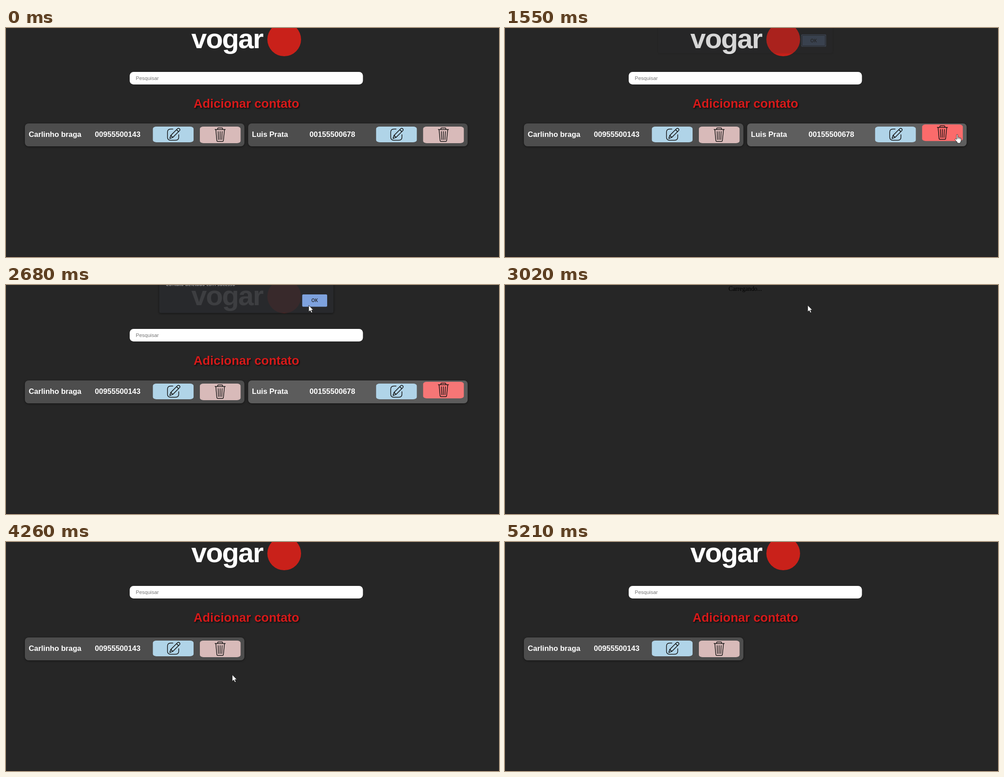
An HTML page that plays this animation: 1096 by 511 pixels, repeating every 5.88 s.

```html
<!DOCTYPE html>
<html lang="pt">
<head>
<meta charset="utf-8">
<title>Contatos</title>
<style>
  html, body { margin: 0; width: 100%; height: 100%; overflow: hidden; background: #262626; }
  svg { display: block; width: 1096px; height: 511px; font-family: "Liberation Sans", Arial, sans-serif; }
  .bold { font-weight: bold; font-size: 16.6px; fill: #fff; }
  .icon { fill: none; stroke: #111; stroke-width: 1.5; stroke-linejoin: round; stroke-linecap: round; }
  .card { filter: drop-shadow(0 1px 2px #0008); }
  #title { font-weight: bold; font-size: 27.65px; fill: #d51a1a; text-shadow: 2px 2px 3px #000a; }
  #brand { font-weight: bold; font-size: 62px; letter-spacing: -2px; fill: #fff; }
  #dialog { filter: drop-shadow(0 1px 2px #0009); }
</style>
</head>
<body>
<svg viewBox="0 0 1096 511">
  <defs>
    <g id="edit" class="icon">
      <path d="M371 225.500H366Q359 225.500 359 232.500V243.500Q359 250.500 366 250.500H377Q384 250.500 384 243.500V238"/>
      <path transform="translate(375 235.500) rotate(45)" d="M-3.200 9V-12Q-3.200 -15 0 -15T3.200 -12V9L0 15.500ZM-3.200 -9H3.200M-3.200 9H3.200"/>
    </g>
    <g id="trash" class="icon">
      <path d="M464.700 226.500H487.500M470.500 226V224.500Q470.500 223 472 223H480Q481.500 223 481.500 224.500V226"/>
      <path d="M466.500 227L468.700 251Q469 253.300 471 253.300H481Q483 253.300 483.300 251L485.700 227M471.600 231L472.500 249M476 231V249M480.500 231L479.600 249"/>
    </g>
  </defs>
  <rect width="1096" height="511" fill="#262626"/>
  <g id="page">
    <text id="brand" x="412" y="45">vogar</text>
    <circle cx="618.500" cy="25.500" r="37.500" fill="#c9211a"/>
    <rect x="275" y="98" width="518.500" height="28" rx="8.500" fill="#fff"/>
    <text x="288.500" y="115.700" font-size="11.500" fill="#757575">Pesquisar</text>
    <text id="title" x="417" y="178">Adicionar contato</text>
    <g id="cards"></g>
  </g>
  <text id="loading" x="497" y="13" font-size="13.700" font-family="Liberation Serif, Times, serif">Carregando...</text>
  <g id="dialog">
    <rect x="340.500" y="-60" width="387.500" height="130.500" rx="4" fill="#292a2d"/>
    <text x="355" y="10.500" font-size="10.800" fill="#e8eaed" font-family="Open Sans, Noto Sans, sans-serif">Contato deletado com sucesso</text>
    <rect id="ok" x="658.500" y="29" width="55.500" height="27.500" rx="2.500"/>
    <rect id="ring" x="660.500" y="31" width="51.500" height="23.500" rx="1.500" fill="none" stroke="#292a2d"/>
    <text x="686" y="46.200" font-size="10.300" font-weight="600" text-anchor="middle" fill="#202124" font-family="Open Sans, Noto Sans, sans-serif">OK</text>
  </g>
  <rect y="510" width="1096" height="1" fill="#231b1f"/>
  <g id="cursor" stroke="#111" stroke-width=".8" fill="#fff">
    <path id="arrow" d="M0 -.7V13.800L3.400 10.800L5.800 16.100L8.200 15L5.900 9.900H10.300Z"/>
    <path id="hand" d="M4 11V2Q4 .5 5.200 .5T6.500 2V7Q9 6 9.300 7.500Q11.500 7 11.800 8.300Q14 8 14 10V14Q14 16 12.500 18V20H5.500V18L.7 12.500Q0 10.500 1.500 10Q2.500 10 4 12Z"/>
    <path id="fingers" d="M6.500 7V11M9.300 7.500V11M11.800 8.300V11.500" fill="none"/>
  </g>
</svg>
<script>
const LOOP = 5880;
const $ = id => document.getElementById(id);

const card = (id, dx, name, phone, phoneX) => `
  <g id="${id}" transform="translate(${dx})">
    <rect class="card" x="42" y="213" width="488" height="51" rx="8" fill="#4d4d4d"/>
    <text class="bold" x="50.500" y="243">${name}</text>
    <text class="bold" x="${phoneX}" y="243">${phone}</text>
    <rect x="326.500" y="220" width="90.500" height="35" rx="8" ry="5" fill="#b0d4e8"/>
    <use href="#edit"/>
    <g class="remove">
      <rect x="431" y="220" width="90.500" height="37" rx="8" ry="5" fill="#d8bab9"/>
      <use href="#trash"/>
    </g>
  </g>`;

$('cards').innerHTML =
  card('first', 0, 'Carlinho braga', '00955500143', 197.5) +
  card('second', 496.3, 'Luis Prata', '00155500678', 178.5);

const panel = $('second').querySelector('.card');
const remove = $('second').querySelector('.remove');

// Pointer path: time, x, y
const path = [
  [130, 1050, 500], [400, 965, 380], [520, 957, 330], [690, 973, 297],
  [810, 973, 297], [1370, 1000, 237], [1620, 1000, 237], [1950, 702, 95],
  [2010, 702, 95], [2540, 673, 46], [3300, 673, 46], [3550, 944, 190],
  [3790, 900, 268], [3860, 900, 268], [4100, 640, 329], [4260, 503, 297],
  [4340, 503, 297], [4410, 491, 296], [4460, 491, 296], [5000, 983, 437],
  [5080, 983, 437], [5210, 1050, 512]
];

const ramp = (t, start, length) => Math.min(1, Math.max(0, (t - start) / length));
const ease = p => p * p * (3 - 2 * p);
const mix = (a, b, p) => a + (b - a) * p;
const blend = (a, b, p) => `rgb(${a.map((v, i) => Math.round(mix(v, b[i], p)))})`;
const show = (id, on) => $(id).style.display = on ? '' : 'none';

function pointer(t) {
  const i = path.findIndex(k => k[0] > t);
  if (i < 1) return null;
  const [a, b] = [path[i - 1], path[i]];
  const p = ramp(t, a[0], b[0] - a[0]);
  return [mix(a[1], b[1], p), mix(a[2], b[2], p)];
}

function drawPointer(t) {
  const at = pointer(t);
  show('cursor', at);
  if (!at) return;
  const hand = t > 1180 && t < 1620;
  show('arrow', !hand);
  show('hand', hand);
  show('fingers', hand);
  $('cursor').setAttribute('transform', `translate(${at})`);
}

function drawDialog(t) {
  const open = ramp(t, 1510, 220), close = ramp(t, 2610, 280);
  const y = close ? -32 * close : -18 * (1 - open);
  $('dialog').setAttribute('transform', `translate(0 ${y})`);
  $('dialog').style.opacity = open * (1 - close ** 1.7);
  $('ok').setAttribute('fill', t > 2420 ? '#88b0f2' : '#8ab4f8');
  show('ring', t < 2420);
}

function draw(t) {
  const loading = t >= 3015 && t < 3260;
  show('page', !loading);
  show('loading', loading);
  show('second', t < 3015);

  const leave = ease(ramp(t, 2610, 300));
  const cardHover = ease(ramp(t, 1080, 200)) * (1 - leave);
  const hover = ease(ramp(t, 1150, 220)) * (1 - leave);
  panel.setAttribute('fill', blend([77, 77, 77], [94, 94, 94], cardHover));
  remove.setAttribute('transform', `translate(0 ${-4.7 * hover})`);
  remove.firstElementChild.setAttribute('fill', blend([216, 186, 185], [251, 107, 107], hover));

  drawDialog(t);
  drawPointer(t);
}

const start = performance.now();
function tick() {
  draw((performance.now() - start) % LOOP);
  requestAnimationFrame(tick);
}
tick();
</script>
</body>
</html>
```
